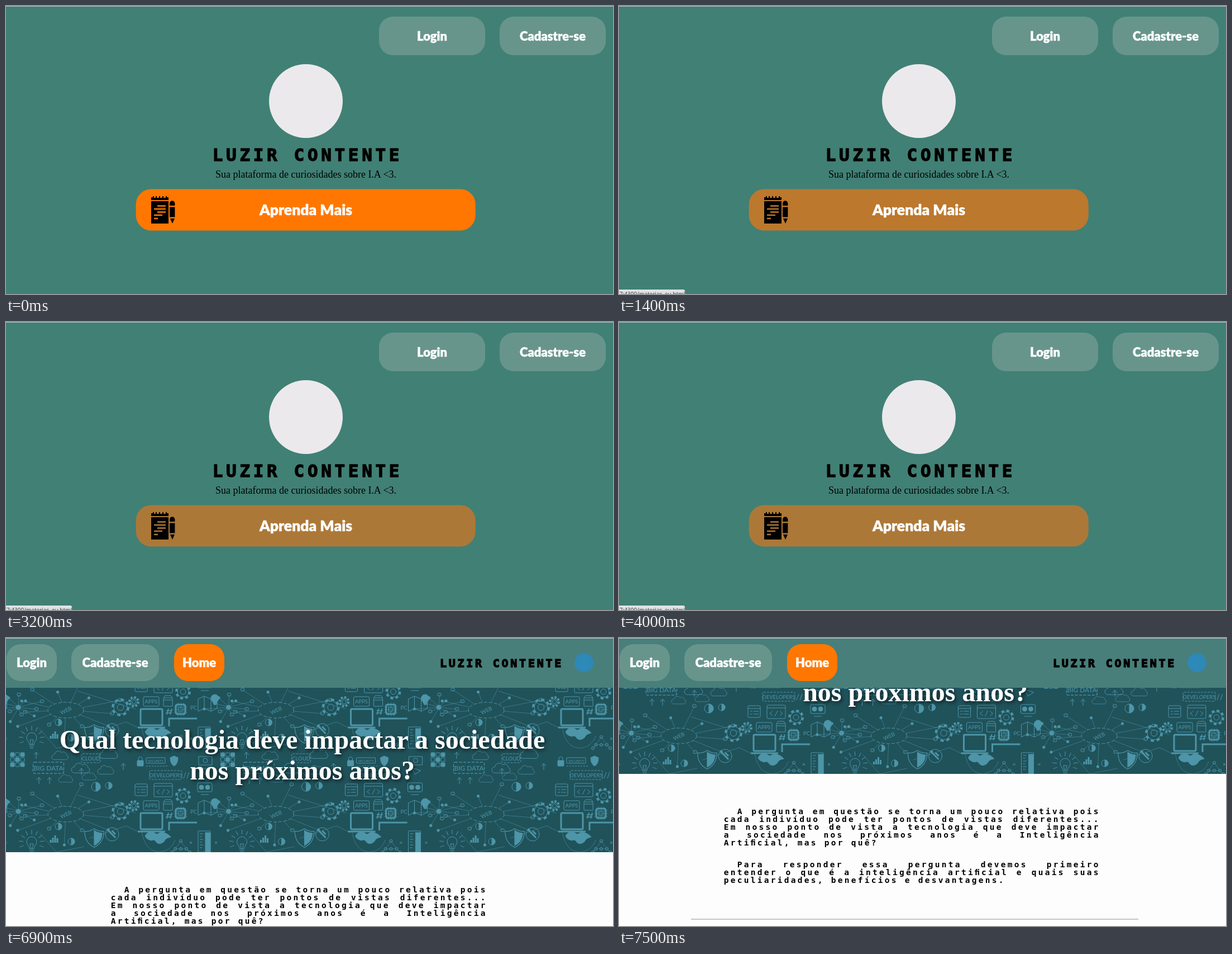
An HTML page that plays this animation: 1087x515 px, repeating every 8 s.

```html
<!DOCTYPE html>
<html lang="pt-BR">
<head>
<meta charset="utf-8">
<title>Curiosidades</title>
<style>
  html, body { margin: 0; width: 100%; height: 100%; overflow: hidden; background: #418075; }
  svg { display: block; width: 1087px; height: 515px; }
  text { white-space: pre; }
  .btn { font: 900 22px Lato, sans-serif; fill: #fff; stroke: #fff; stroke-width: .5; text-anchor: middle; }
  .big { font-size: 26.5px; }
  .mono { font-family: "DejaVu Sans Mono", monospace; font-weight: 700; }
  .wide { stroke: #000; stroke-width: 1.3; }
  .sub { font: 18px "Liberation Serif", serif; text-anchor: middle; }
  .head { font: 700 48px "Liberation Serif", serif; fill: #fff; text-anchor: middle;
          filter: drop-shadow(2px 3px 3px rgba(0,0,0,.65)); }
  .status { font: 10px "Noto Sans", sans-serif; fill: #444; }
  .doodle { fill: none; stroke: #4d95a8; stroke-width: 1; }
  .doodle text { font: 9.5px Lato, sans-serif; fill: #4d95a8; stroke: none; text-anchor: middle; }
  .doodle .full { fill: #4d95a8; }
  .doodle .thick { stroke-width: 3; }
  .doodle .thin { stroke-width: .7; opacity: .8; }
</style>
</head>
<body>
<svg id="stage" viewBox="0 0 1087 515" xmlns="http://www.w3.org/2000/svg"></svg>
<script>
const LOOP = 8000, STEP = 100, FADE = 500;
const REST = [103, 149, 140], TEAL = [45, 162, 167];
const ORANGE = [255, 119, 0], BROWN = [172, 120, 56];
const rgb = c => `rgb(${c.map(Math.round)})`;

// ---- drawing helpers ----
const rect = (x, y, w, h, r = 0, more = '') =>
  `<rect x="${x}" y="${y}" width="${w}" height="${h}" rx="${r}" ${more}/>`;
const circle = (x, y, r, more = '') => `<circle cx="${x}" cy="${y}" r="${r}" ${more}/>`;
const path = (d, more = '') => `<path d="${d}" ${more}/>`;
const text = (x, y, s, cls = '') => `<text x="${x}" y="${y}" class="${cls}">${s}</text>`;
const FULL = 'class="full"', THICK = 'class="thick"', THIN = 'class="thin"';

function mono(x, y, s, size, pitch, cls = '') {
  const gap = pitch - .602 * size;
  return `<text class="mono ${cls}" x="${x + gap / 2}" y="${y}" font-size="${size}" letter-spacing="${gap}">${s}</text>`;
}

function button(x, y, w, h, label, color, id = '') {
  return rect(x, y, w, h, 25, `id="${id}" fill="${rgb(color)}"`) +
    text(x + w / 2, y + h / 2 + 8, label, 'btn');
}

// One justified line of fixed-pitch words
function justified(y, s, indent = 0, fill = true) {
  const pitch = 12, words = s.split(' ');
  const chars = words.join('').length;
  const gap = fill ? (674 - indent - chars * pitch) / (words.length - 1) : pitch;
  let x = 186 + indent;
  return words.map(w => {
    const out = mono(x, y, w, 14.5, pitch);
    x += w.length * pitch + gap;
    return out;
  }).join('');
}

// ---- banner doodles ----
const gear = (x, y, r) =>
  circle(x, y, r - 4) + circle(x, y, r * .35) +
  circle(x, y, r - 2, `stroke-width="4" stroke-dasharray="${r * .36} ${(r - 2) * Math.PI / 4 - r * .36}"`);

const cloud = (x, y, s) =>
  path(`M-14 7a6 6 0 0 1 0-12a9 9 0 0 1 16-4a7 7 0 0 1 11 5a6 6 0 0 1 0 11z`,
    `transform="translate(${x} ${y}) scale(${s})"`);

const label = (x, y, w, s) =>
  rect(x - w / 2, y - 8, w, 16, 2, 'stroke-dasharray="4 2"') + text(x, y + 4, s);

const shield = (x, y, s) =>
  `<g transform="translate(${x} ${y}) scale(${s})">` +
  path('M0-14Q8-9 15-10Q15 8 0 15Q-15 8-15-10Q-8-9 0-14z') +
  path('M0-11V12Q12 6 12-7Q6-7 0-11z', FULL) + '</g>';

function spokes(x, y, rx, ry, n, len) {
  let out = '';
  for (let i = 0; i < n; i++) {
    const a = (i + .3) * 2 * Math.PI / n, far = len * (1 + .45 * Math.sin(i * 2.7));
    const c = Math.cos(a), s = Math.sin(a);
    const ex = x + c * (rx + far), ey = y + s * (ry + far * .55);
    out += path(`M${x + c * rx} ${y + s * ry}L${ex} ${ey}`, THIN);
    out += i % 2 ? circle(ex, ey, 2.2, FULL) : rect(ex - 3, ey - 3, 6, 5, 1);
  }
  return out;
}

const pie = (x, y, r) => circle(x, y, r) + path(`M${x} ${y}v${-r}a${r} ${r} 0 0 1 0 ${2 * r}z`, FULL);
const arrow = (x, y) => path(`M${x} ${y + 6}v-11m-4 4l4-5l4 5`);

function grid() {
  let out = '';
  for (let i = 0; i < 9; i++)
    out += rect(8 + i % 3 * 9, 233 + (i / 3 | 0) * 9, 7, 7, 1, i % 2 ? '' : FULL);
  return out;
}

function bulb() {
  let rays = '';
  for (let a = -200; a <= 20; a += 27.5)
    rays += path('M15 0h8', `transform="translate(46 208) rotate(${a})"`);
  return rays + path('M42 219q0-4-3-7a9 9 0 1 1 14 0q-3 3-3 7zM42 222h8m-7 3h6m-4-6l-2-9h6l-2 9');
}

const tile = () => [
  spokes(107, 157, 32, 14, 13, 52), spokes(22, 152, 3, 3, 11, 30), circle(22, 152, 4, FULL),
  '<ellipse cx="107" cy="157" rx="32" ry="14" stroke-dasharray="6 3"/>',
  '<g transform="rotate(-25 107 157)">' + text(107, 161, 'WEB') + '</g>',
  arrow(59, 97), arrow(78, 97), cloud(108, 95, .7), cloud(150, 91, .7),
  pie(161, 108, 8), pie(184, 106, 6),
  path('M129 123L232 155M150 200L215 178L240 190M60 190L90 225L140 215', THIN),
  rect(231, 103, 22, 21, 2), path('M231 108h22M235 113h4m2 0h9M235 118h4m2 0h9'),
  rect(265, 102, 33, 24, 2), path('M265 107h33m-23 6l-5 4l5 4m13-8l5 4l-5 4m-4-9l-5 10'),
  gear(205, 152, 16), gear(229, 142, 10), gear(317, 124, 14),
  rect(246, 133, 28, 17, 2), text(260, 145, 'APPS'),
  rect(282, 135, 16, 15, 1), path('M282 135l3-4h10l3 4m-16 4h16'),
  rect(304, 147, 17, 17, 3, THICK), rect(309, 152, 7, 7, 1),
  path('M308 143v25m5-25v25m5-25v25M300 151h25m-25 5h25m-25 5h25', THIN),
  path('M288 165l3-11m3 11l3-11m-10 4h11m-12 4h11', 'stroke-width="1.6"'),
  rect(241, 155, 39, 29, 2, THICK), path('M236 188h49M292 186v-14h50', THICK),
  text(336, 156, 'PC'),
  rect(343, 101, 26, 16, 2), circle(350, 109, 4, FULL), circle(361, 109, 4, FULL), path('M349 122h14'),
  path('M344 137l11-5l12 5l11-5v22l-11 5l-12-5l-11 5zM355 132v22m12-17v22'),
  path('M374 148q-7-9-7-12a7 7 0 0 1 14 0q0 3-7 12z', FULL),
  path('M249 196q5-9 14-7l7 4l8-4q12 2 17 9q-9 1-12 8q-8 7-14 1q-3-6-9-3q-9-2-11-8z', FULL),
  path('M243 188q6 36 32 37q21-2 28-22', THIN),
  rect(344, 187, 22, 38, 1), rect(357, 190, 9, 35, 0, FULL),
  path('M347 192h6m-6 5h4m-4 5h6m-6 5h4m-4 5h6m-6 5h4'),
  path('M313 205l-10 14h20zM303 219l-5 6m25-6l6 6', THIN),
  ...[[313, 205], [303, 219], [323, 219], [298, 225], [329, 225], [313, 219]].map(p => circle(...p, 2.5)),
  path('M329 206l4 4m0-4l-4 4M374 206l4 4m0-4l-4 4'),
  bulb(), pie(94, 179, 6), pie(117, 206, 6), path('M80 208v-5m4 5v-9m4 9v-13m4 13v-8', THICK),
  shield(158, 199, 1.15), circle(190, 193, 12), path('M184 187l12 12m-6-12l6 6', THICK),
  grid(), arrow(54, 238), cloud(98, 240, .8), cloud(185, 237, .9), cloud(135, 263, .9), cloud(180, 266, .8),
  arrow(135, 267), arrow(210, 258), label(152, 243, 34, 'CLOUD'),
  `<g transform="translate(76 260) scale(1.25)">${label(0, 0, 44, 'BIG DATA')}</g>`,
  rect(235, 247, 11, 10, 1, FULL), path('M237 247v-3a3.5 3.5 0 0 1 7 0v3'),
  rect(251, 242, 34, 10, 1), `<g transform="translate(268 250) scale(.65)">${text(0, 0, 'SECURITY')}</g>`,
  path('M301 239l7 3q0 11-7 15q-7-4-7-15z', FULL), path('M251 257h38', 'stroke-dasharray="3 2"'),
  label(286, 273, 58, 'DEVELOPERS'), path('M318 279l4-11m2 11l4-11'),
  path('M345 240h24v15h-24zM350 260l16 5l-10 7z'), circle(357, 247, 4),
].join('');

function copies() {
  let out = '';
  for (let row = -1; row < 2; row++)
    for (let col = -1; col < 3; col++)
      out += `<use href="#tile" x="${col * 376.5}" y="${row * 186}"/>`;
  return out;
}

// ---- the two pages ----
const notebook = `<g id="note">
  <path d="M260 349h31v40h-31zM260 347v-5h3v-2h2v3h3v-3h2v3h4v-3h2v3h4v-3h2v3h4v-3h2v2h3v5z"/>
  <path d="M293 357v-4a4.700 4.700 0 0 1 9.400 0v4zM293 359.500h9.400v18h-9.400zM294 380h8l-4 9z"/>
  <path id="rules" d="M271 357.500h15M265 363h21M271 368.500h15M265 374h15M265 380h7" fill="none" stroke-width="2.600"/></g>`;

const home = `<g id="home">${rect(0, 0, 1087, 515, 0, 'fill="#418075"')}
  ${button(668, 19, 190, 69, 'Login', REST, 'login')}
  ${button(884, 19, 190, 69, 'Cadastre-se', REST, 'join')}
  ${circle(537, 170, 66, 'fill="#ebe9ec"')}
  ${mono(367, 277, 'LUZIR CONTENTE', 31, 24.3, 'wide')}
  ${text(537, 307, 'Sua plataforma de curiosidades sobre I.A &lt;3.', 'sub')}
  ${rect(232.7, 327.5, 608, 74, 27, 'id="learn"')}${notebook}
  ${text(537, 374, 'Aprenda Mais', 'btn big')}
  <g id="status">${path('M0 507h115q3 0 3 3v5H0z', 'fill="#dfe2e5"')}
  ${text(1, 519, '7:4300/materias_eu.html', 'status')}</g></g>`;

const article = `<g id="article">${rect(0, 0, 1087, 515, 0, 'fill="#fdfdfd"')}
  <g id="scroll">
    <g clip-path="url(#banner)">${rect(0, 89, 1087, 322, 0, 'fill="#20525a"')}${copies()}</g>
    ${text(530.5, 226, 'Qual tecnologia deve impactar a sociedade', 'head')}
    ${text(530.5, 281, 'nos próximos anos?', 'head')}
    ${justified(483, 'A pergunta em questão se torna um pouco relativa pois', 24)}
    ${justified(497, 'cada indivíduo pode ter pontos de vistas diferentes...')}
    ${justified(511, 'Em nosso ponto de vista a tecnologia que deve impactar')}
    ${justified(525, 'a sociedade nos próximos anos é a Inteligência')}
    ${justified(539, 'Artiﬁcial, mas por quê?', 0, false)}
    ${justified(578, 'Para responder essa pergunta devemos primeiro', 24)}
    ${justified(592, 'entender o que é a inteligência artiﬁcial e quais suas')}
    ${justified(606, 'peculiaridades, benefícios e desvantagens.', 0, false)}
    ${rect(129, 670, 801, 1.5, 0, 'fill="#b4b4b4"')}
  </g>
  ${rect(0, 0, 1087, 89, 0, 'fill="#487f7a"')}
  ${button(1, 11, 90, 66, 'Login', REST)}
  ${button(117, 11, 157, 66, 'Cadastre-se', REST)}
  ${button(301, 11, 90, 66, 'Home', ORANGE)}
  ${mono(775, 52, 'LUZIR CONTENTE', 20, 15.8, 'wide')}
  ${circle(1035, 44, 17, 'fill="#2e88b8"')}</g>`;

const $ = id => document.getElementById(id);
$('stage').innerHTML = `<defs><clipPath id="banner">${rect(0, 89, 1087, 322)}</clipPath>
  <g class="doodle"><g id="tile" class="doodle">${tile()}</g></g></defs>
  ${home}${article}${rect(0, 0, 1087, 1, 0, 'fill="#b7c6c3"')}`;

// ---- motion ----
const clamp = v => Math.min(1, Math.max(0, v));
const smooth = v => (v = clamp(v), v * v * (3 - 2 * v));

// CSS "ease": cubic-bezier(.25, .1, .25, 1)
function ease(x) {
  if (x <= 0 || x >= 1) return clamp(x);
  let lo = 0, hi = 1;
  const bez = (a, b, u) => 3 * a * u * (1 - u) ** 2 + 3 * b * u * u * (1 - u) + u ** 3;
  for (let i = 0; i < 20; i++) {
    const mid = (lo + hi) / 2;
    if (bez(.25, .25, mid) < x) lo = mid; else hi = mid;
  }
  return bez(.1, 1, lo);
}

// Alternating enter and leave times for each button
const hovers = {
  login: [380, 450],
  join: [2300, 2680, 3250, 3510],
  learn: [1150, 1750, 2750, 3230, 3550],
};

function level(times, t) {
  let from = 0, to = 0, start = -FADE, span = FADE;
  const at = x => from + (to - from) * ease((x - start) / span);
  times.forEach((time, i) => {
    if (time > t) return;
    const now = at(time);
    to = i % 2 ? 0 : 1;
    span = FADE * Math.max(.4, Math.abs(to - now));
    from = now;
    start = time;
  });
  return at(t);
}

const blend = (a, b, k) => rgb(a.map((v, i) => v + (b[i] - v) * k));

function draw(time) {
  const t = Math.floor(time % LOOP / STEP) * STEP;
  const onHome = t < 4900;
  $('home').style.display = onHome ? '' : 'none';
  $('article').style.display = onHome ? 'none' : '';
  for (const id of ['login', 'join'])
    $(id).setAttribute('fill', blend(REST, TEAL, level(hovers[id], t)));
  const hot = blend(ORANGE, BROWN, level(hovers.learn, t));
  $('learn').setAttribute('fill', hot);
  $('rules').setAttribute('stroke', hot);
  const inside = hovers.learn.filter(h => h <= t - 30).length % 2;
  $('status').style.display = inside ? '' : 'none';
  const y = 84 * (smooth((t - 6815) / 220) + smooth((t - 7310) / 180));
  $('scroll').setAttribute('transform', `translate(0 ${-Math.round(y)})`);
}

const begin = performance.now();
function tick() {
  draw(performance.now() - begin);
  requestAnimationFrame(tick);
}
tick();
</script>
</body>
</html>
```
